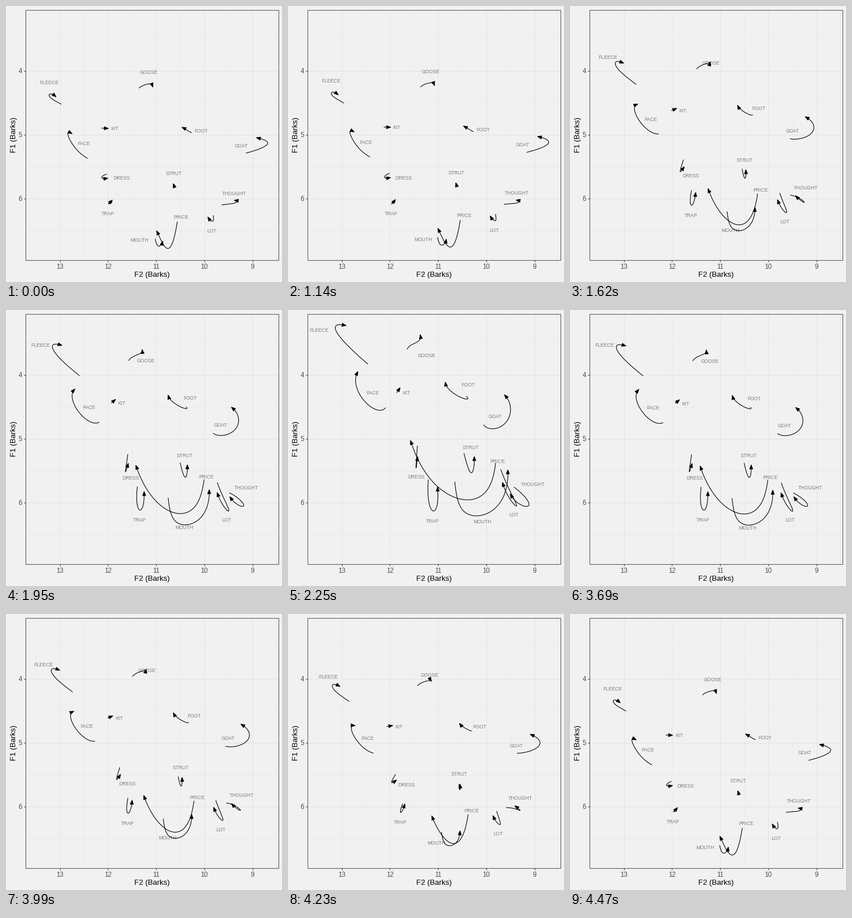
A matplotlib script that plays this animation: 480x480 px, repeating every 4500 ms.

```python
import numpy as np
import matplotlib.pyplot as plt
from matplotlib.animation import FuncAnimation
from matplotlib.patches import Polygon, Rectangle

SIZE, DPI = 480, 72  # at 72 dpi one point is one pixel
FRAMES, INTERVAL = 150, 30
LEFT, RIGHT, TOP, BOTTOM = 34.2, 473.5, 6.5, 441.5
LINE = 1.07

plt.rcParams["font.family"] = "Liberation Sans"
fig = plt.figure(figsize=(SIZE / DPI, SIZE / DPI), dpi=DPI, facecolor="#f1f1f1")
ax = fig.add_axes([0, 0, 1, 1])
ax.set_xlim(0, SIZE)
ax.set_ylim(SIZE, 0)
ax.axis("off")


def x_of(f2):
    return 93.5 + (13 - f2) * 83.75


def y_of(f1):
    return 113.3 + (f1 - 4) * 111


def segment(xs, ys, color, width, order=1):
    ax.plot(xs, ys, color=color, lw=width, zorder=order, solid_capstyle="butt")


def centred(x, y, text, size, color, **kw):
    return ax.text(x, y + 0.35 * size, text, fontsize=size, color=color,
                   ha="center", va="baseline", **kw)


def draw_panel():
    for half in range(17, 28):
        x = x_of(half / 2)
        major = half % 2 == 0
        segment([x, x], [TOP, BOTTOM], "#e5e5e5", LINE if major else LINE / 2)
        if major:
            segment([x, x], [BOTTOM, BOTTOM + 3], "#333333", LINE)
            centred(x, 452.5, str(half // 2), 11.5, "#4d4d4d")
    for half in range(7, 14):
        y = y_of(half / 2)
        major = half % 2 == 0
        segment([LEFT, RIGHT], [y, y], "#e5e5e5", LINE if major else LINE / 2)
        if major:
            segment([LEFT - 3, LEFT], [y, y], "#333333", LINE)
            centred(25, y, str(half // 2), 11.5, "#4d4d4d")
    ax.add_patch(Rectangle((LEFT, TOP), RIGHT - LEFT, BOTTOM - TOP, fill=False,
                           ec="#5c5c5c", lw=LINE, zorder=5))
    centred(253.7, 466.3, "F2 (Barks)", 13.2, "black")
    ax.text(16.7, 224, "F1 (Barks)", fontsize=13.2, color="black", rotation=90,
            rotation_mode="anchor", ha="center", va="baseline")


def smooth(points):
    """Polynomial curve through points evenly spaced in time."""
    n = len(points)
    basis = np.linalg.inv(np.vander(np.linspace(0, 1, n)))
    return np.vander(np.linspace(0, 1, 81), n) @ basis @ np.array(points, float)


class Vowel:
    def __init__(self, name, labels, first, last):
        self.labels = np.array(labels, float)
        self.paths = smooth(first), smooth(last)
        self.text = centred(0, 0, name, 8.54, "#7f7f7f", zorder=2)
        self.line, = ax.plot([], [], color="black", lw=LINE, zorder=3,
                             solid_capstyle="butt", solid_joinstyle="round")
        self.head = ax.add_patch(Polygon(np.zeros((3, 2)), fc="black", ec="black",
                                         lw=1, joinstyle="round", zorder=3))

    def pose(self, mix):
        x, y = (1 - mix) * self.labels[0] + mix * self.labels[1]
        self.text.set_position((x, y + 3))
        path = (1 - mix) * self.paths[0] + mix * self.paths[1]
        tip = path[-1]
        ahead = tip - path[-5]
        ahead /= np.hypot(*ahead)
        side = np.array([-ahead[1], ahead[0]])
        base = tip - 7 * ahead
        self.line.set_data(path[:, 0], path[:, 1])
        self.head.set_xy([tip, base + 2.7 * side, base - 2.7 * side])


draw_panel()

# name, label at both ends of the motion, then the trajectory at both ends
vowels = [
    Vowel("FLEECE", [(75, 133), (54, 35)],
          [(96, 171), (83, 163.5), (75.5, 157), (77, 153), (87, 158)],
          [(139, 94), (110, 68), (89, 45), (82.5, 29), (101, 27)]),
    Vowel("FACE", [(135, 239), (147.5, 144)],
          [(142, 265), (125, 252), (113, 236), (107.5, 222.5), (115, 222)],
          [(169.5, 170), (151.5, 172.5), (131, 156), (118.5, 131), (121.5, 107)]),
    Vowel("KIT", [(189, 213), (205.5, 144)],
          [(166, 212.3), (178, 213)],
          [(189, 144), (195, 135)]),
    Vowel("DRESS", [(200.5, 299), (222.5, 290)],
          [(175, 292.5), (169, 295), (166.5, 298), (168.5, 300), (177, 299.5)],
          [(225, 236), (223.3, 262), (222.6, 274), (223.2, 272), (225.5, 255)]),
    Vowel("TRAP", [(177, 361), (251.5, 367)],
          [(185, 341), (180, 343.5), (178, 344), (179.5, 342.5), (185, 337.5)],
          [(244, 295), (245, 334), (252, 349.3), (259, 340.6), (260, 308)]),
    Vowel("GOOSE", [(248.5, 115), (241, 79)],
          [(231, 143), (238, 138.5), (246, 136), (252, 136), (255.5, 141)],
          [(207, 68.5), (212, 62.5), (220, 58), (228, 53), (230, 43)]),
    Vowel("FOOT", [(339.5, 217), (313.5, 130)],
          [(323, 220.5), (319, 218.5), (315, 216), (311, 213.5), (306, 211)],
          [(310, 150), (312.5, 154.5), (303, 153), (285, 142.5), (273.5, 125.5)]),
    Vowel("GOAT", [(409.5, 243), (360, 185)],
          [(417, 256), (438, 249.5), (453, 242), (453, 235), (435.5, 229)],
          [(340, 199.5), (358, 206.5), (378.5, 196), (387, 172.5), (376.5, 147.5)]),
    Vowel("STRUT", [(292, 291), (318, 239)],
          [(294, 311), (293, 312.5), (292.5, 313), (292, 312), (291, 309)],
          [(306, 249), (313, 273.7), (318.5, 283), (322.5, 276.7), (324, 255)]),
    Vowel("THOUGHT", [(397, 326), (426, 303)],
          [(375, 346), (391, 344), (398, 342.5), (401, 340), (397, 338)],
          [(393, 308), (411, 324), (419, 339), (406.5, 339.5), (386.5, 320)]),
    Vowel("LOT", [(357.5, 391), (392.5, 356)],
          [(360.5, 364), (361, 370), (360, 374), (356.5, 373.5), (351, 367)],
          [(370, 277), (389.5, 321.6), (397.5, 340.3), (389, 333), (373, 300)]),
    Vowel("PRICE", [(304.5, 367), (364, 263)],
          [(298, 375), (291.5, 406), (282.5, 421.5), (272, 412), (262, 391)],
          [(361, 266), (344, 316), (308, 330), (259, 306), (213, 227)]),
    Vowel("MOUTH", [(232, 407), (338, 368)],
          [(259.5, 405), (262, 414), (265.5, 417.5), (269.5, 415.5), (272.5, 409)],
          [(290, 298.5), (301, 344), (327, 358), (363, 342), (382.5, 278)]),
]


def update(frame):
    # hold, glide to the last shape, hold, glide back
    mix = np.interp(frame, [37, 75, 113, FRAMES], [0, 1, 1, 0])
    for vowel in vowels:
        vowel.pose(mix)
    return []


anim = FuncAnimation(fig, update, frames=FRAMES, interval=INTERVAL,
                     repeat=True, repeat_delay=0, init_func=lambda: update(0))
plt.show()
```
